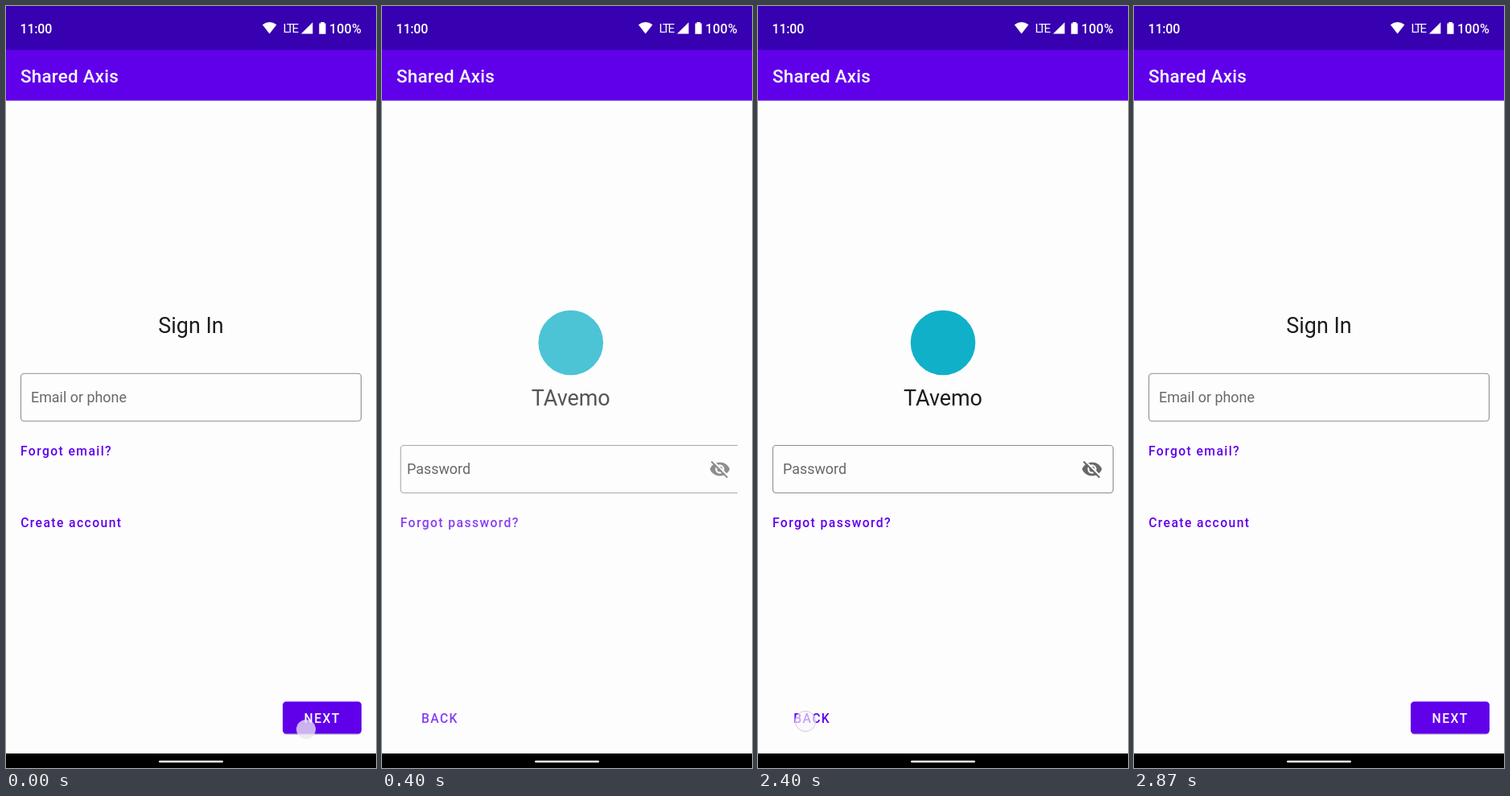
Animation, 460 px wide and 946 px high, one loop 2.91 s. Source, as an HTML page:

```html
<!DOCTYPE html>
<html lang="en">
<head>
<meta charset="utf-8">
<title>Shared Axis</title>
<style>
  html, body { margin: 0; width: 100%; height: 100%; overflow: hidden; background: #fdfdfe; }
  svg { display: block; width: 460px; height: 946px; font-family: Roboto, sans-serif; }
  .title { font-size: 26.9px; text-anchor: middle; fill: #1c1c1c; }
  .hint { font-size: 17.9px; fill: #68686a; }
  .link { font-size: 15.7px; font-weight: 500; letter-spacing: 1.4px; fill: #6000ea; }
  .box { fill: none; stroke: #8e8e8e; stroke-width: 1.1; }
  .status { font-size: 16px; font-weight: 500; }
</style>
</head>
<body>
<svg viewBox="0 0 460 946" xmlns="http://www.w3.org/2000/svg">
  <defs>
    <clipPath id="inset"><rect x="18" y="440" width="424" height="180"/></clipPath>
  </defs>
  <rect width="460" height="946" fill="#fdfdfe"/>

  <g id="signIn">
    <g class="move">
      <text class="title" x="230" y="406.3">Sign In</text>
      <text class="link" x="18" y="557.5">Forgot email?</text>
      <text class="link" x="18.2" y="647">Create account</text>
      <rect x="344.3" y="865.2" width="97.4" height="39.6" rx="4.5" opacity=".2"/>
      <rect x="344" y="863.5" width="98" height="40" rx="4.5" fill="#6000ea"/>
      <text class="link" x="370.6" y="889.5" style="fill:#fff">NEXT</text>
    </g>
    <g clip-path="url(#inset)">
      <g class="move"><rect class="box" x="18.5" y="456.3" width="423" height="59" rx="4"/></g>
    </g>
  </g>

  <g id="password">
    <g class="move">
      <circle cx="230" cy="418" r="40.3" fill="#10b0c8"/>
      <text class="title" x="230" y="495.8">TAvemo</text>
      <text class="link" x="18" y="647">Forgot password?</text>
      <text class="link" x="44.2" y="889.5">BACK</text>
    </g>
    <g clip-path="url(#inset)">
      <g class="move">
        <rect class="box" x="18.5" y="545.5" width="423" height="59" rx="4"/>
        <g transform="translate(401.8 561.5) scale(1.12)" fill="none" stroke="#fdfdfe">
          <path d="M1 12C2.7 7.6 7 4.5 12 4.5S21.3 7.6 23 12C21.3 16.4 17 19.5 12 19.5S2.7 16.4 1 12Z" fill="#68686a" stroke="none"/>
          <circle cx="12" cy="12" r="4" stroke-width="2"/>
          <path d="M3.9 2.3L21.7 20.1" stroke-width="1.8"/>
          <path d="M2.6 3.6L20.4 21.4" stroke-width="1.8" stroke="#68686a"/>
        </g>
      </g>
    </g>
  </g>

  <text class="hint" id="emailHint" x="31" y="491.8">Email or phone</text>
  <text class="hint" id="passHint" x="31" y="581.2">Password</text>

  <rect width="460" height="55" fill="#3700b0"/>
  <rect y="54.5" width="460" height="63" fill="#6000ea"/>
  <g fill="#fff">
    <text class="status" x="17.5" y="33.8" letter-spacing="-.2">11:00</text>
    <path d="M327.6 34.6L318.8 23.2Q327.6 17 336.4 23.2Z"/>
    <text x="344.6" y="33.4" font-size="15" letter-spacing="-2">LTE</text>
    <path d="M381.3 20.2V34.6H366.8Z"/>
    <path d="M391.3 20H395.7V21.5H397.5V34.8H389.3V21.5H391.3Z"/>
    <text class="status" x="402" y="33.8" letter-spacing=".2">100%</text>
    <text x="18" y="95" font-size="22.4" font-weight="500" letter-spacing=".24">Shared Axis</text>
  </g>
  <rect y="928" width="460" height="18"/>
  <rect x="190" y="936.7" width="80" height="2.6" rx="1.3" fill="#fafafa"/>

  <circle id="nextTap" cx="373" cy="898" r="12" fill="#ebe4f2" fill-opacity=".78"/>
  <circle id="backTap" cx="59" cy="888" r="12.7" fill="#faf8fc" fill-opacity=".65" stroke="#cfcbd6"/>
</svg>
<script>
  const LOOP = 2910, LENGTH = 300, SLIDE = 33;
  const FORWARD = 228, BACKWARD = 2578;
  const $ = id => document.getElementById(id);
  const clamp = v => Math.min(1, Math.max(0, v));

  // Cubic Bezier easing, solved by bisection
  function bezier(x1, y1, x2, y2) {
    const at = (a, b, s) => 3 * a * s * (1 - s) ** 2 + 3 * b * s * s * (1 - s) + s ** 3;
    return x => {
      if (x <= 0 || x >= 1) return clamp(x);
      let lo = 0, hi = 1;
      for (let i = 0; i < 24; i++) {
        const mid = (lo + hi) / 2;
        if (at(x1, x2, mid) < x) lo = mid; else hi = mid;
      }
      return at(y1, y2, lo);
    };
  }
  const standard = bezier(.4, 0, .2, 1);
  const accelerate = bezier(.4, 0, 1, 1);
  const decelerate = bezier(0, 0, .2, 1);

  function setPage(id, x, alpha) {
    const page = $(id);
    page.setAttribute('opacity', alpha);
    page.querySelectorAll('.move').forEach(g => g.setAttribute('transform', `translate(${x} 0)`));
  }

  // dir is 1 going forward and -1 going back
  function swap(from, to, ms, dir) {
    const p = standard(clamp(ms / LENGTH));
    setPage(from, -dir * SLIDE * p, 1 - accelerate(clamp(ms / 90)));
    setPage(to, dir * SLIDE * (1 - p), decelerate(clamp((ms - 90) / 210)));
  }

  const fade = (t, start, hold, end) => t < start ? 0 : 1 - clamp((t - hold) / (end - hold));

  function draw(t) {
    if (t < BACKWARD) swap('signIn', 'password', t - FORWARD, 1);
    else swap('password', 'signIn', t - BACKWARD, -1);

    const onPassword = t >= FORWARD && t < BACKWARD;
    $('emailHint').setAttribute('opacity', onPassword ? 0 : 1);
    $('passHint').setAttribute('opacity', onPassword ? 1 : 0);
    $('nextTap').setAttribute('opacity', fade(t, 0, 100, 370));
    $('backTap').setAttribute('opacity', fade(t, 2400, 2470, 2720));
  }

  const begin = performance.now();
  function tick() {
    draw((performance.now() - begin) % LOOP);
    requestAnimationFrame(tick);
  }
  draw(0);
  requestAnimationFrame(tick);
</script>
</body>
</html>
```
